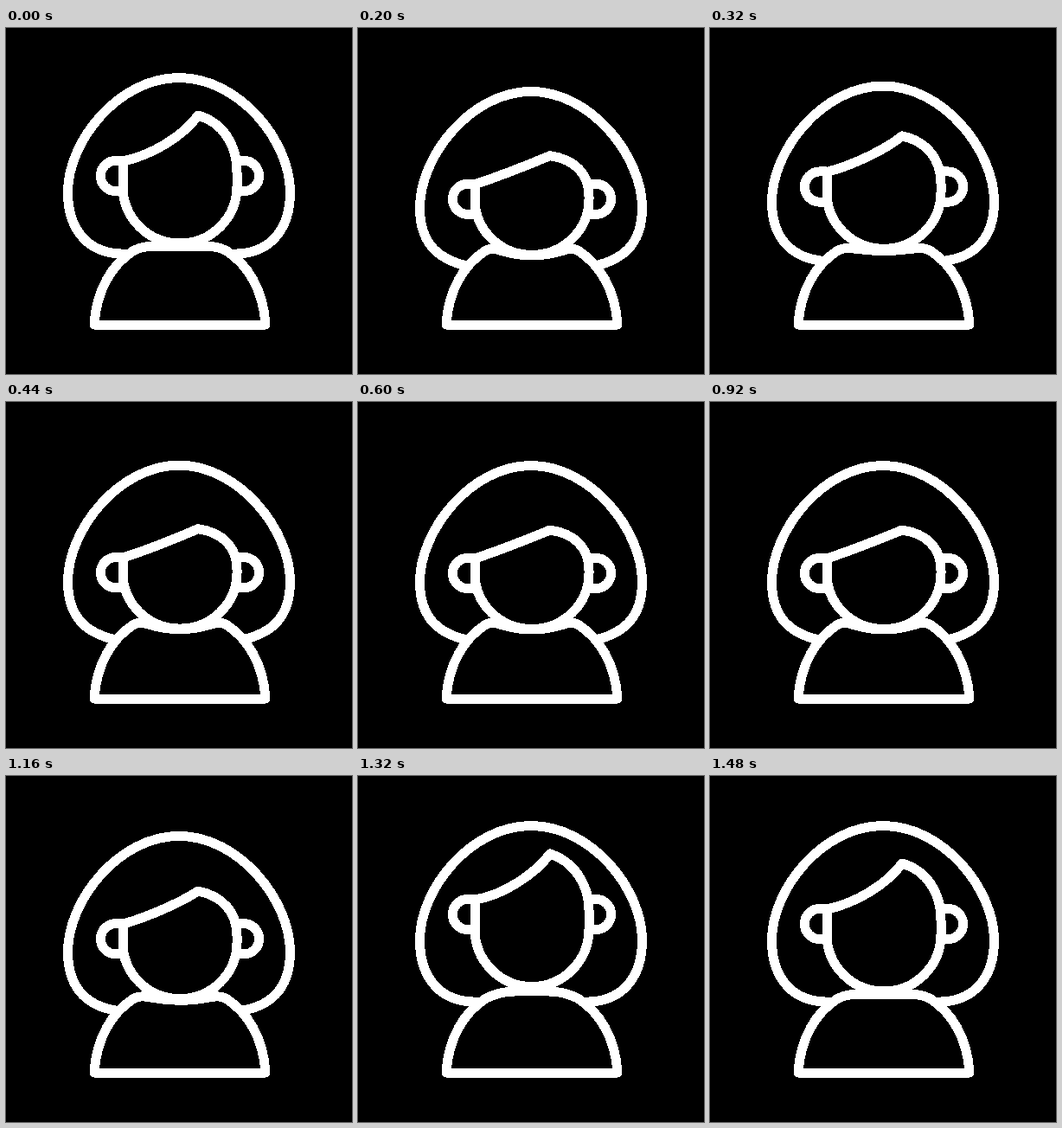
Recreate the animation shown at these times as an HTML page. Size 400x400 px, loop 1.64 s.

```html
<!DOCTYPE html>
<html lang="en">
<head>
<meta charset="utf-8">
<title>Nodding avatar</title>
<style>
  html, body { margin: 0; width: 100%; height: 100%; overflow: hidden; background: #000; }
  svg { display: block; width: 100vw; height: 100vh; }
  path {
    fill: none; stroke: #fff; stroke-width: 11;
    stroke-linecap: round; stroke-linejoin: round; shape-rendering: crispEdges;
  }
</style>
</head>
<body>
<svg viewBox="0 0 400 400">
  <g transform="translate(200)">
    <path id="hair"/>
    <use href="#hair" transform="scale(-1 1)"/>
  </g>
  <g transform="translate(201)">
    <g id="side">
      <path id="body"/>
      <path id="ear"/>
    </g>
    <use href="#side" transform="scale(-1 1)"/>
    <path id="face"/>
  </g>
</svg>
<script>
const LOOP = 1640;

// How far each part is raised: 0 is the deepest nod, 1 the highest.
const down = { head: 0, tip: 0, hair: 0 };
const half = { head: 0.38, tip: 0.4, hair: 0.4 };
const rest = { head: 0.71, tip: 0.81, hair: 1 };
const up = { head: 1, tip: 1, hair: 1 };

const keys = [
  [0, rest], [180, down], [320, half], [480, down], [600, down],
  [760, half], [920, down], [1055, down], [1320, up], [1480, rest], [LOOP, rest]
];

const ease = k => k < 0.5 ? 4 * k ** 3 : 1 - 4 * (1 - k) ** 3;

function poseAt(t) {
  const i = keys.findIndex(k => k[0] > t);
  const [t0, a] = keys[i - 1], [t1, b] = keys[i];
  const k = ease((t - t0) / (t1 - t0));
  const mix = part => a[part] + (b[part] - a[part]) * k;
  return { head: mix('head'), tip: mix('tip'), hair: mix('hair') };
}

const setPath = (id, d) => document.getElementById(id).setAttribute('d', d);

// Left half; the right one is mirrored.
function drawHair(k) {
  const top = 73.5 - 16 * k, side = 208 - 18 * k;
  setPath('hair', `M${-75 + 15 * k} ${275 - 14 * k}
    C-103 ${268 - 5 * k} -128.5 ${side + 45} -128.5 ${side}
    C-128.5 ${side - 60} -69 ${top} 0 ${top}`);
}

// The chin presses the collar down.
function drawBody(k) {
  const collar = 263 - 14.5 * k;
  setPath('body', `M0 343 H-99 C-96.5 302 -78 273 -53 257
    C-40 251 -34 ${collar} 0 ${collar}`);
}

function drawHead(k, tip) {
  const ear = 198 - 38 * k, r = 17.6;
  setPath('ear', `M-66 ${ear - r} H-74 a${r} ${r} 0 0 0 0 ${2 * r} H-66`);

  const jaw = 198 - 21 * k, chin = 262.5 - 19 * k;
  setPath('face', `M-66 ${ear - 17}
    C-33 ${170 - 32 * k} 4 ${155 - 42 * k} 21 ${148 - 58 * tip}
    C49 ${152 - 53 * tip} 66 ${168 - 42 * tip} 66 ${195 - 40 * k}
    V${jaw} A66 ${chin - jaw} 0 0 1 -66 ${jaw} Z`);
}

const start = performance.now();
function tick() {
  const pose = poseAt((performance.now() - start) % LOOP);
  drawHair(pose.hair);
  drawBody(pose.head);
  drawHead(pose.head, pose.tip);
  requestAnimationFrame(tick);
}
tick();
</script>
</body>
</html>
```
